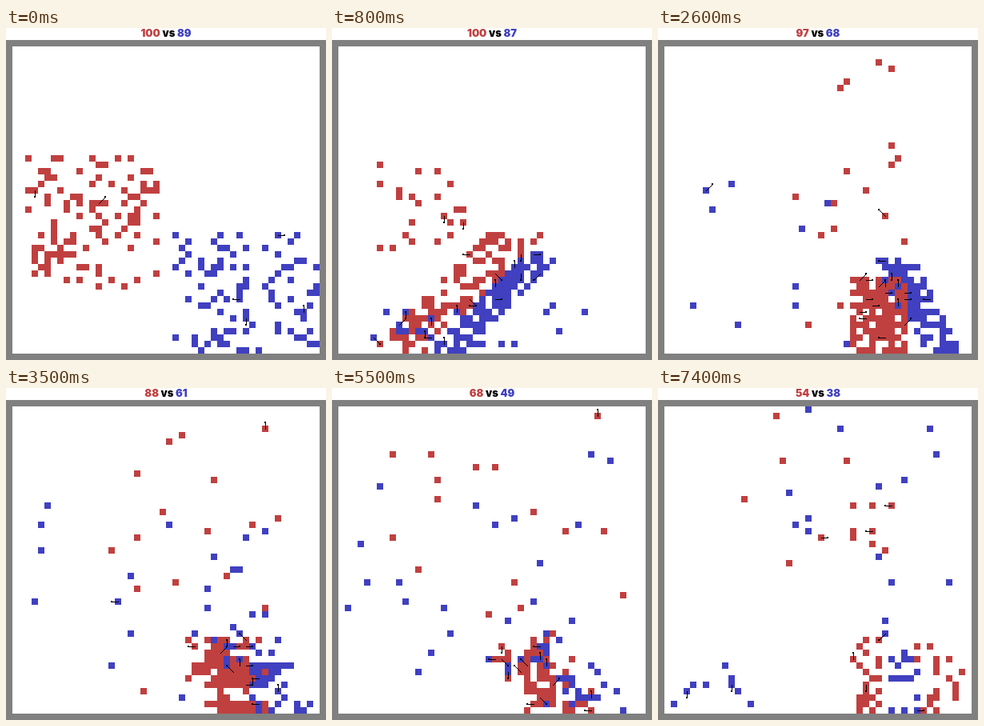
These frames come from a looping animation (400x415 px, 7.5 s). An HTML page with a canvas:

```html
<!DOCTYPE html>
<html lang="en">
<head>
<meta charset="utf-8">
<title>Two armies</title>
<style>
  html, body { margin: 0; width: 100%; height: 100%; overflow: hidden; background: #fff; }
  canvas { position: absolute; left: 0; top: 0; }
  p { position: absolute; left: 0; top: 0; width: 400px; margin: 0; text-align: center;
      font: 900 13px/13px "Arial Black", Inter, "DejaVu Sans", sans-serif; color: #000; white-space: pre; }
  #red { color: #c04040; }
  #blue { color: #4040c0; }
</style>
</head>
<body>
<canvas id="stage" width="400" height="415"></canvas>
<p><span id="red"></span> vs <span id="blue"></span></p>
<script>
const SIZE = 48, CELL = 8, STEP = 100, FRAMES = 75;
const COLORS = ['#c04040', '#4040c0'];
const ctx = document.getElementById('stage').getContext('2d');
const labels = [document.getElementById('red'), document.getElementById('blue')];

let seed = 4321;
const rnd = () => (seed = seed * 16807 % 2147483647) / 2147483647;

// Picks random cells of a box whose rows shift sideways by lean.
function field(count, col, row, w, h, lean = 0) {
  const cells = [];
  for (let y = 0; y < h; y++)
    for (let x = 0; x < w; x++)
      cells.push({ at: [Math.round(col + x + lean * y), row + y], key: rnd() });
  return cells.sort((a, b) => a.key - b.key).slice(0, count).map(c => c.at);
}

// A leaning column that reaches down to the floor
const front = (count, col, row, w, lean) => field(count, col, row, w, SIZE - row, lean);

const poses = [];
function pose(frame, red, blue) {
  poses.push({ frame, sides: [red.flat(), blue.flat()] });
}

pose(0, [field(100, 2, 17, 21, 21)], [field(89, 25, 29, 23, 19)]);

pose(8,
  [field(22, 5, 18, 15, 14), front(78, 23, 29, 9, -1)],
  [field(25, 3, 40, 37, 7), front(62, 29, 32, 6, -1)]);

pose(16,
  [field(6, 14, 8, 9, 18), field(24, 8, 37, 13, 8), front(70, 33, 29, 5, -.7)],
  [field(8, 4, 36, 4, 10), front(71, 37, 32, 6, -.7)]);

pose(26,
  [field(17, 20, 1, 18, 44), front(80, 29, 36, 9, 0)],
  [field(10, 2, 20, 28, 28), front(58, 33, 33, 6, .5)]);

pose(44,
  [field(14, 4, 1, 40, 30), front(64, 27, 37, 8, .5)],
  [field(20, 2, 5, 44, 42), front(34, 30, 35, 5, .8)]);

pose(66,
  [field(15, 4, 2, 35, 30), front(43, 24, 37, 5, .7)],
  [field(24, 0, 19, 46, 28), front(19, 27, 36, 4, .8)]);

pose(74,
  [field(14, 12, 1, 24, 24), field(18, 39, 37, 8, 11), front(22, 29, 36, 5, 0)],
  [field(9, 1, 40, 14, 8), field(15, 16, 0, 30, 36), front(14, 35, 38, 5, 0)]);

// Pairs each unit with a near goal; the units left without one fall on the way.
function march(from, to) {
  const goals = from.map((_, i) => to[i] || null);
  const cost = (a, b) => b ? (a[0] - b[0]) ** 2 + (a[1] - b[1]) ** 2 : 0;
  for (let pass = 0; pass < 6; pass++)
    for (let i = 0; i < from.length; i++)
      for (let j = 0; j < i; j++)
        if (cost(from[i], goals[j]) + cost(from[j], goals[i]) <
            cost(from[i], goals[i]) + cost(from[j], goals[j]))
          [goals[i], goals[j]] = [goals[j], goals[i]];
  const units = from.map((a, i) => ({ a, b: goals[i] || a, dies: !goals[i], phase: rnd() * 6.28 }));
  return units.sort((u, v) => u.dies - v.dies);
}

const clamp = v => Math.max(0, Math.min(SIZE - 1, Math.round(v)));

// Nearby offsets, closest first
const offsets = [];
for (let y = -6; y <= 6; y++) for (let x = -6; x <= 6; x++) offsets.push([x, y]);
offsets.sort((a, b) => Math.hypot(...a) - Math.hypot(...b));
const around = offsets.slice(1, 9);

function snapshot(armies, p, span) {
  const taken = new Map();
  const key = (x, y) => x + y * 100;
  const wander = Math.min(2, span / 10) * Math.sin(Math.PI * p);
  const units = [];
  const scores = armies.map(({ units: army, end }, side) => {
    const alive = Math.round(army.length + (end - army.length) * p);
    for (const { a, b, phase } of army.slice(0, alive)) {
      const col = clamp(a[0] + (b[0] - a[0]) * p + wander * Math.sin(phase + p * 6));
      const row = clamp(a[1] + (b[1] - a[1]) * p + wander * Math.cos(phase * 3 + p * 5));
      const free = offsets.find(([dx, dy]) => {
        const x = col + dx, y = row + dy;
        return x === clamp(x) && y === clamp(y) && !taken.has(key(x, y));
      });
      const unit = { x: col + free[0], y: row + free[1], side };
      taken.set(key(unit.x, unit.y), side);
      units.push(unit);
    }
    return alive;
  });
  for (const u of units) {
    const foe = around.find(([dx, dy]) => taken.get(key(u.x + dx, u.y + dy)) === 1 - u.side);
    if (rnd() < (foe ? .22 : .07))
      u.aim = foe || around[Math.floor(rnd() * (rnd() < .7 ? 4 : 8))];
  }
  return { units, scores };
}

const frames = [];
for (let i = 1; i < poses.length; i++) {
  const from = poses[i - 1], to = poses[i], span = to.frame - from.frame;
  const armies = from.sides.map((side, k) => ({ units: march(side, to.sides[k]), end: to.sides[k].length }));
  for (let f = i > 1 ? 1 : 0; f <= span; f++) frames.push(snapshot(armies, f / span, span));
}

function draw({ units, scores }) {
  ctx.fillStyle = '#fff';
  ctx.fillRect(0, 0, 400, 415);
  ctx.fillStyle = '#808080';
  ctx.fillRect(0, 15, 400, 400);
  ctx.fillStyle = '#fff';
  ctx.fillRect(8, 23, 384, 384);
  for (const { x, y, side } of units) {
    ctx.fillStyle = COLORS[side];
    ctx.fillRect(8 + x * CELL, 23 + y * CELL, CELL, CELL);
  }
  ctx.fillStyle = '#000';
  for (const { x, y, aim } of units) {
    if (!aim) continue;
    const cx = 12 + x * CELL, cy = 27 + y * CELL;
    for (let i = 0; i < CELL; i++) ctx.fillRect(cx + aim[0] * i, cy + aim[1] * i, 1, 1);
    ctx.fillRect(cx + aim[0] * CELL - 1, cy + aim[1] * CELL - 1, 2, 2);
  }
  labels.forEach((label, k) => label.textContent = scores[k]);
}

let shown = -1;
const start = performance.now();
function tick() {
  const n = Math.floor((performance.now() - start) / STEP) % FRAMES;
  if (n !== shown) draw(frames[shown = n]);
  requestAnimationFrame(tick);
}
tick();
</script>
</body>
</html>
```
